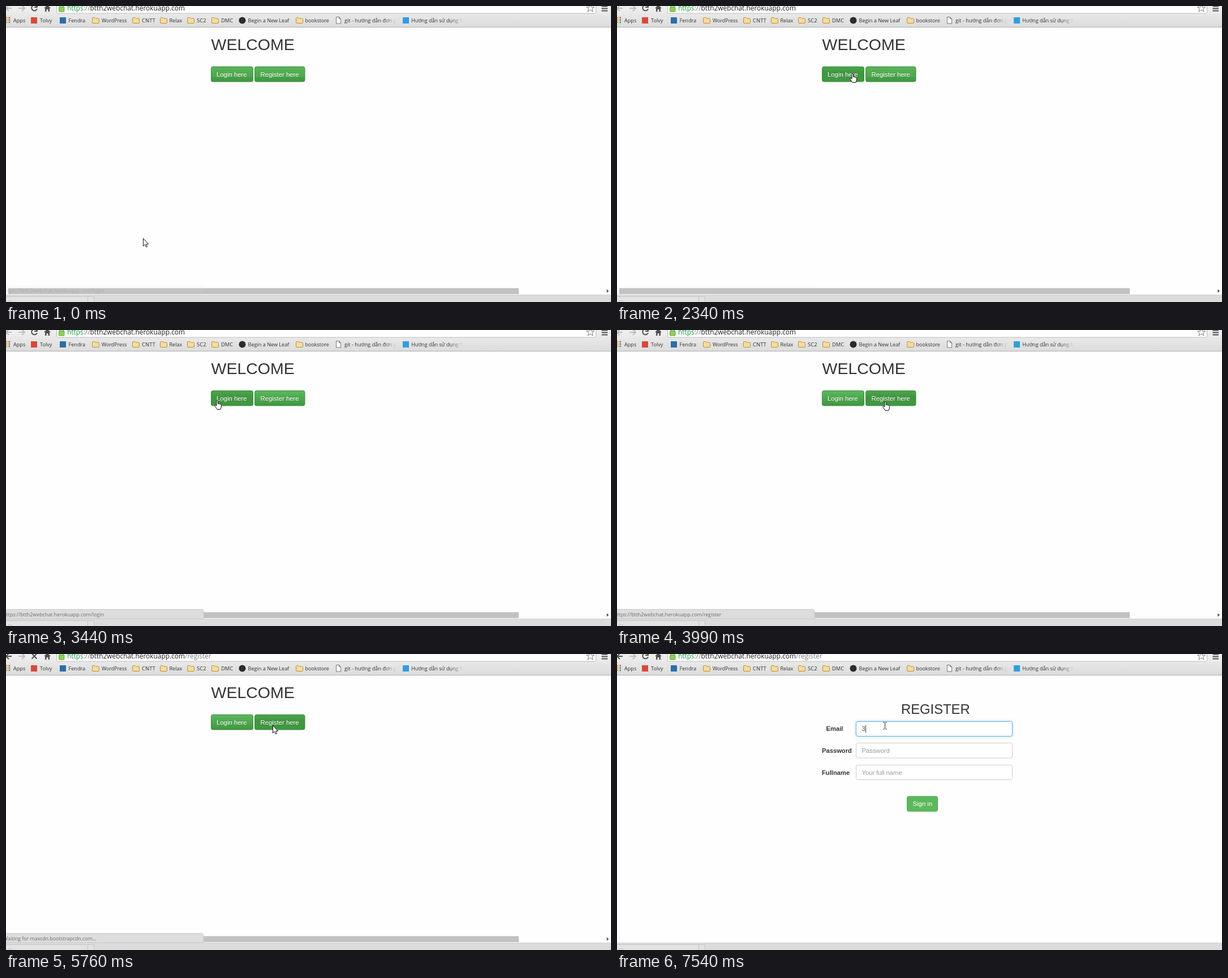
Write an HTML page that moves like this. It is 1069 px wide and 524 px high and loops after 7990 ms.

```html
<!DOCTYPE html>
<html lang="en">
<head>
<meta charset="utf-8">
<title>Web chat sign-up</title>
<style>
html, body { margin: 0; width: 100%; height: 100%; overflow: hidden; background: #fefefe; }
svg { display: block; width: 1069px; height: 524px; }
text { white-space: pre; }
.ui { font-family: "Open Sans", "Noto Sans", sans-serif; fill: #333; }
.page { font-family: "Liberation Sans", Arial, sans-serif; font-size: 11.2px; fill: #333; }
.btn { font-size: 11.35px; fill: #fff; text-shadow: 0 -1px 0 rgba(0,0,0,.2); }
.plain { text-shadow: none; }
.hint { fill: #999; }
.bold { font-weight: bold; }
.field { fill: #fff; stroke: #ccc; }
.field.focus { stroke: #66afe9; }
.field.glow { filter: drop-shadow(0 0 2px rgba(102,175,233,.6)); }
.icon { fill: none; stroke: #4f4f4f; stroke-width: 2; }
.cursor { fill: #fff; stroke: #111; stroke-linejoin: round; }
</style>
</head>
<body>
<svg viewBox="0 0 1069 524">
  <defs>
    <linearGradient id="bar" x2="0" y2="1"><stop stop-color="#f0f0f0"/><stop offset="1" stop-color="#dcdcdc"/></linearGradient>
    <linearGradient id="rest" x2="0" y2="1"><stop stop-color="#58b358"/><stop offset=".68" stop-color="#4ea94e"/><stop offset=".68" stop-color="#469e46"/><stop offset="1" stop-color="#429742"/></linearGradient>
    <linearGradient id="light" x2="0" y2="1"><stop stop-color="#5cb85c"/><stop offset="1" stop-color="#419641"/></linearGradient>
    <linearGradient id="dark" x2="0" y2="1"><stop stop-color="#4ba44b"/><stop offset=".45" stop-color="#419641"/></linearGradient>
    <linearGradient id="fade1" gradientUnits="userSpaceOnUse" x1="668" x2="690" y1="0" y2="0"><stop stop-color="#333"/><stop offset="1" stop-color="#333" stop-opacity="0"/></linearGradient>
    <linearGradient id="fade2" gradientUnits="userSpaceOnUse" x1="785" x2="807" y1="0" y2="0"><stop stop-color="#333"/><stop offset="1" stop-color="#333" stop-opacity="0"/></linearGradient>
    <path id="folder" d="M.5 2.5q0-1.5 1.5-1.5h3l1.5 1.5H11q1.5 0 1.5 1.5v5.5q0 1.5-1.5 1.5H2Q.5 11 .5 9.5Z" fill="#f7dc9b" stroke="#b98f45"/>
  </defs>

  <rect width="1069" height="524" fill="#fefefe"/>

  <!-- welcome page -->
  <g id="welcome" class="page">
    <text x="362.5" y="78" font-size="28.5">WELCOME</text>
    <g stroke="#3e8f3e">
      <rect id="login" x="362.5" y="107.5" width="74" height="26.5" rx="3"/>
      <rect id="register" x="439.5" y="107.5" width="88.5" height="26.5" rx="3"/>
    </g>
    <text class="btn" x="372" y="125">Login here</text>
    <text class="btn" x="449.5" y="125">Register here</text>
    <rect x="4" y="499.5" width="902" height="10.5" fill="#c1c1c1"/>
    <path d="M1061.5 501.5v6l3.5-3Z" fill="#484848"/>
  </g>

  <!-- registration page -->
  <g id="form" class="page">
    <text x="502" y="106" font-size="23.8">REGISTER</text>
    <g class="bold">
      <text x="369.5" y="136">Email</text>
      <text x="362" y="175">Password</text>
      <text x="362" y="214">Fullname</text>
    </g>
    <rect id="email" class="field" x="422.5" y="119.5" width="276" height="26" rx="3"/>
    <rect class="field" x="422.5" y="157.5" width="276" height="26.5" rx="3"/>
    <rect class="field" x="422.5" y="196.5" width="276" height="26" rx="3"/>
    <text id="value" x="432.5" y="136"></text>
    <text class="hint" x="432.5" y="175">Password</text>
    <text class="hint" x="432.5" y="214">Your full name</text>
    <rect id="caret" y="126" width="1" height="13" fill="#333"/>
    <rect x="512.5" y="252" width="54" height="26.5" rx="3" fill="#5cb85c" stroke="#4cae4c"/>
    <text class="btn plain" x="522.5" y="269">Sign in</text>
  </g>

  <!-- toolbar -->
  <rect width="1069" height="37" fill="url(#bar)"/>
  <rect y="37" width="1069" height="1" fill="#b0b0b0"/>
  <path d="M89.5-4V11q0 2 2 2H1040.5q2 0 2-2V-4Z" fill="#fff" stroke="#bcbcbc"/>
  <path id="back" class="icon" d="M10 4H1M5-1 0 4 5 9"/>
  <path class="icon" d="M22 4H32M28-1 33 4 28 9" style="stroke:#bdbdbd"/>
  <path id="reload" class="icon" d="M54 0A5 5 0 1 0 55 5M55-3V2H50"/>
  <path id="stop" class="icon" d="M45.5-1 54.5 8.5M54.5-1 45.5 8.5"/>
  <path d="M67 4 73-2 79 4H77V10H74.5V6H71.5V10H69V4Z" fill="#4f4f4f"/>
  <path d="M95.5 3V-1H101.5V3" fill="none" stroke="#74b34b" stroke-width="1.5"/>
  <rect x="93.5" y="1.5" width="9.5" height="8.5" rx="1" fill="#8fce5c" stroke="#5ea335"/>
  <path d="M1032.5-3 1034.5 2H1039.5L1035.5 5 1037 10 1032.5 7 1028 10 1029.5 5 1025.5 2H1030.5Z" fill="#fff" stroke="#777"/>
  <path class="icon" d="M1052.5.5H1063M1052.5 4.5H1063M1052.5 8.5H1063"/>
  <g class="ui" font-size="11.9">
    <text x="108" y="8"><tspan fill="#169b3f">https</tspan><tspan fill="#777">://</tspan><tspan fill="#222">btth2webchat.herokuapp.com</tspan><tspan id="path" fill="#808080">/register</tspan></text>
  </g>

  <!-- bookmarks -->
  <g id="dots"></g>
  <rect x="44" y="20" width="11" height="11" fill="#d9483b"/>
  <rect x="95" y="20" width="11" height="11" fill="#2c6ea8"/>
  <circle cx="417.5" cy="25.5" r="6" fill="#2b2b2b"/>
  <path d="M583.5 19.5H588.5L591.5 22.5V31H583.5ZM588.5 19.5V22.5H591.5" fill="#fff" stroke="#777"/>
  <rect x="701" y="20" width="11" height="11" fill="#2f9fdc"/>
  <g id="marks" class="ui"></g>

  <!-- download shelf -->
  <rect y="511" width="1069" height="13" fill="#dcdcdc"/>
  <rect y="511" width="1069" height="1" fill="#d0d0d0"/>
  <path d="M-1 514.5H155.5V525H-1Z" fill="#e3e3e3" stroke="#c4c4c4"/>
  <path d="M144.5 515V524" stroke="#c4c4c4"/>
  <circle cx="7" cy="526" r="4.5" fill="none" stroke="#bbb"/>

  <!-- link status -->
  <path id="bubble" d="M-1 494.5H346q3 0 3 3V511H-1Z" fill="#ddd" stroke="#cdcdcd"/>
  <text id="status" class="ui" x="-5" y="507" font-size="8.85" style="fill:#6c6c6c"></text>

  <!-- pointers -->
  <path id="arrow" class="cursor" d="M.5.5V14L3.5 11.2 5.6 15.7 7.6 14.8 5.6 10.4H9.7Z"/>
  <path id="hand" class="cursor" d="M4 10V2a1.3 1.3 0 0 1 2.6 0V6.8a1.2 1.2 0 0 1 2.2.4a1.2 1.2 0 0 1 2 .5a1.1 1.1 0 0 1 1.7 1V12L11 16.5H5L1 10.5C.2 9 1.6 8.4 2.6 9.3Z"/>
  <path id="beam" fill="none" stroke="#222" d="M0 .5H2.5M4.5.5H7M3.5 1V12M0 12.5H2.5M4.5 12.5H7"/>
</svg>
<script>
const LOOP = 7990;
const $ = id => document.getElementById(id);
const NS = "http://www.w3.org/2000/svg";

function add(parent, tag, attrs, text) {
  const el = document.createElementNS(NS, tag);
  for (const k in attrs) el.setAttribute(k, attrs[k]);
  if (text) el.textContent = text;
  return $(parent).appendChild(el);
}

// label, text x, font size, folder x
const marks = [
  ["Apps", 13, 9.1], ["Tolvy", 60, 9.1], ["Fendra", 110.5, 9.1],
  ["WordPress", 169, 8.9, 152], ["CNTT", 240, 9.5, 223], ["Relax", 288.5, 9.1, 272],
  ["SC2", 337, 9.5, 320], ["DMC", 380, 9.3, 363], ["Begin a New Leaf", 427.5, 9.1],
  ["bookstore", 528.5, 8.95, 512]
];
for (const [label, x, size, folder] of marks) {
  add("marks", "text", { x, y: 28.5, "font-size": size }, label);
  if (folder) add("marks", "use", { href: "#folder", x: folder, y: 19.5 });
}
add("marks", "text", { x: 598, y: 28.5, "font-size": 9.2, style: "fill:url(#fade1)" }, "git - hướng dẫn đơn g");
add("marks", "text", { x: 716, y: 28.5, "font-size": 9, style: "fill:url(#fade2)" }, "Hướng dẫn sử dụng M");

["#e8a33d", "#d9534f", "#e8a33d", "#4f9d4f", "#e8a33d", "#4a86d8"].forEach((fill, i) =>
  add("dots", "rect", { x: i % 2 * 4.5, y: 19.5 + (i >> 1) * 4, width: 2.6, height: 2.6, fill }));

// time, pointer, x, y, hovered button
const moves = [
  [0, "arrow", 242, 411], [120, "arrow", 236, 419], [1640, "arrow", 273, 367],
  [1780, "arrow", 452, 186], [1910, "arrow", 442, 59], [2060, "arrow", 408, 141],
  [2190, "hand", 374, 122, "login"], [2340, "hand", 411, 119, "login"],
  [2490, "hand", 441, 119, "register"], [2620, "hand", 450, 118, "register"],
  [2760, "hand", 411, 117, "login"], [2890, "hand", 414, 118, "login"],
  [3040, "hand", 448, 120, "register"], [3310, "hand", 388, 122, "login"],
  [3440, "hand", 368, 124, "login"], [3560, "hand", 406, 125, "login"],
  [3690, "hand", 455, 125, "register"], [3830, "hand", 467, 126, "register"],
  [3990, "hand", 469, 126, "register"], [4700, "arrow", 471, 126, "register"],
  [5890, "beam", 470, 120.5]
];

const host = "btth2webchat.herokuapp.com";
const toLogin = `https://${host}/login`;
const toRegister = `https://${host}/register`;
const waitHost = `Waiting for ${host}...`;
const waitCdn = "Waiting for maxcdn.bootstrapcdn.com...";

// time, message, text opacity, bubble opacity
const notes = [
  [0, toLogin, .25, .1], [120, "", 0, .03], [2890, toLogin, .5, .5],
  [3040, toRegister, 1, 1], [3310, toLogin, 1, 1], [3690, toRegister, 1, 1],
  [5370, toRegister, .5, .6], [5490, waitHost, 1, 1], [5760, waitCdn, 1, 1],
  [5890, waitCdn, .4, 0], [6040, waitCdn, .25, 0], [6160, waitCdn, .12, 0],
  [6310, "", 0, 0]
];

const at = (rows, t) => rows.filter(r => r[0] <= t).pop();
const show = (id, on) => { $(id).style.display = on ? "" : "none"; };

function draw(t) {
  const [, pointer, x, y, hover] = at(moves, t);
  for (const id of ["arrow", "hand", "beam"]) show(id, id === pointer);
  $(pointer).setAttribute("transform", `translate(${x} ${y})`);
  const idle = t < 2490 ? "rest" : "light";
  for (const id of ["login", "register"])
    $(id).setAttribute("fill", `url(#${id === hover ? "dark" : idle})`);

  const [, message, ink, fill] = at(notes, t);
  $("status").textContent = message;
  $("status").style.opacity = ink;
  $("bubble").style.opacity = fill;

  const loaded = t >= 5890, loading = t >= 4820 && !loaded;
  show("welcome", !loaded);
  show("form", loaded);
  show("stop", loading);
  show("reload", !loading);
  show("path", t >= 5100);
  $("back").style.stroke = t >= 5100 ? "#4f4f4f" : "#bdbdbd";

  const typed = t >= 7540;
  $("email").setAttribute("class", "field" + (t >= 6610 ? " focus" : "") + (t >= 6760 ? " glow" : ""));
  $("value").textContent = typed ? "3" : "Email";
  $("value").style.fill = typed ? "#555" : "#999";
  $("caret").setAttribute("x", typed ? 439 : 432);
  show("caret", typed || (t >= 6610 && t < 7030));
}

const start = performance.now();
function tick() {
  draw((performance.now() - start) % LOOP);
  requestAnimationFrame(tick);
}
tick();
</script>
</body>
</html>
```
